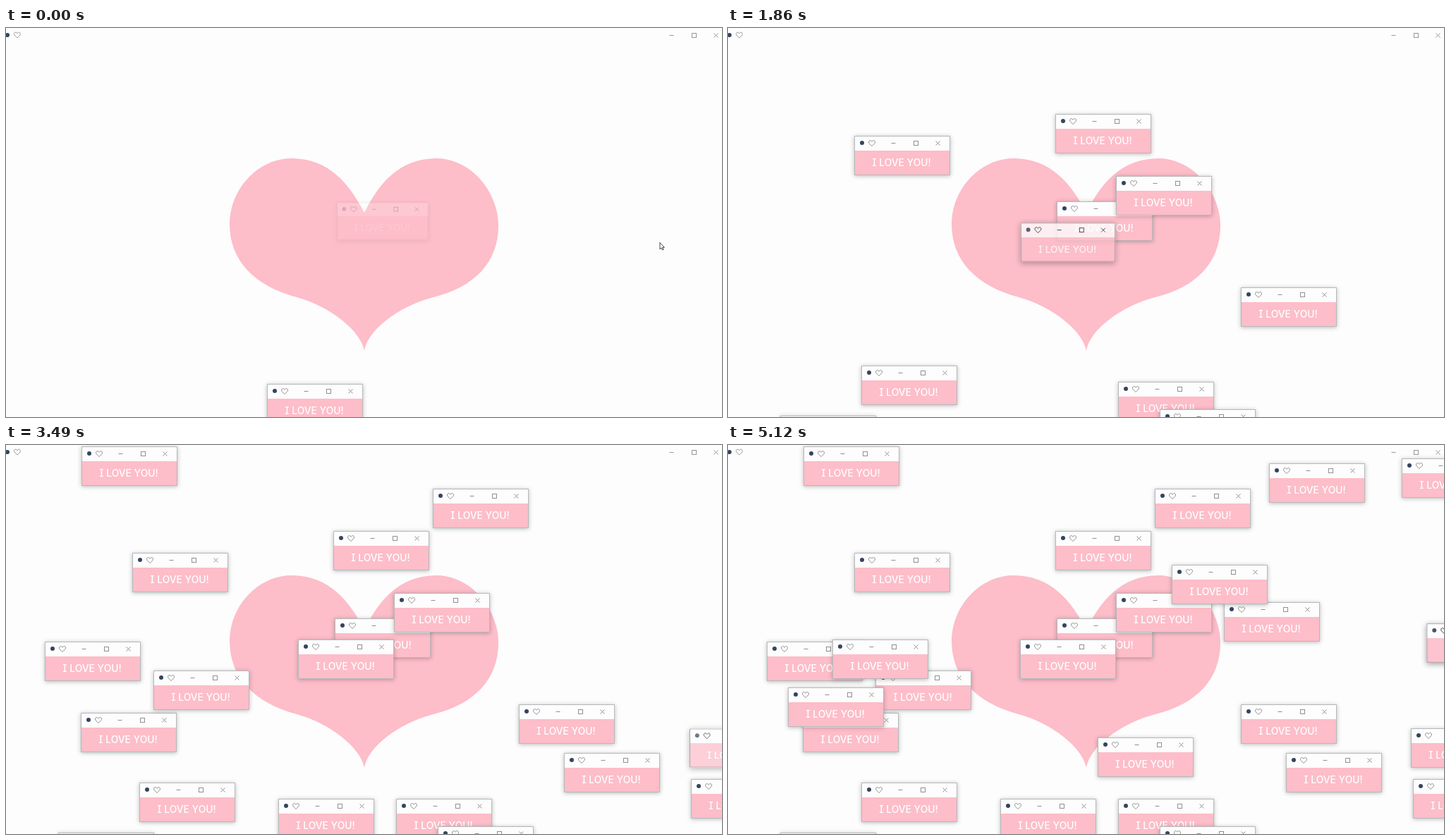
An HTML page for the animation above (5.48 s loop, 1015x552 px).

```html
<!DOCTYPE html>
<html lang="en">
<head>
<meta charset="utf-8">
<title>I LOVE YOU!</title>
<style>
  html, body { margin: 0; width: 100%; height: 100%; overflow: hidden; background: #fdfdfd; }
  #stage { position: relative; width: 1015px; height: 552px; overflow: hidden; background: #fdfdfd; }
  svg { position: absolute; left: 0; top: 0; display: block; }
  .icons { fill: none; stroke: currentColor; stroke-width: 1; }
  .main { color: #969696; }
  .win {
    position: absolute; width: 136px; height: 56px;
    color: #909090; background: #fdfdfd;
    box-shadow: 0 1px 6px rgba(40, 44, 40, .32);
  }
  .win.active { color: #222; box-shadow: 0 2px 8px rgba(30, 34, 30, .45); }
  .edge { fill: none; stroke: #b6b8bc; }
  .active .edge { stroke: #85878a; }
  .win text {
    font: 500 13.8px Inter, "Open Sans", sans-serif;
    font-feature-settings: "cv08";
    fill: #fff; text-anchor: middle;
  }
</style>
</head>
<body>
<div id="stage">
  <svg width="1015" height="552">
    <defs>
      <path id="heart" d="M0 4C-2 2-4.5 .5-4.5-1.6C-4.5-4.2-1.2-4.8 0-2.2C1.2-4.8 4.5-4.2 4.5-1.6C4.5 .5 2 2 0 4Z"/>
      <g id="buttons">
        <path d="M-34.5 .5h6M28.5-2.5l6 6m0-6l-6 6"/>
        <rect x="-2.5" y="-2.5" width="6" height="6"/>
      </g>
    </defs>
    <path fill="#fdbdc9" d="M508 262C490 228 462 185 405 185C356 185 317 230 317 278C317 330 352 366 412 382
      C460 395 503 430 508 458C512 430 555 395 606 382C664 368 698 332 698 281C698 232 659 185 610 185C553 185 525 228 508 262Z"/>
    <circle cx="2" cy="10" r="3" fill="#35445f"/>
    <g class="icons main">
      <use href="#heart" x="16" y="10"/>
      <use href="#buttons" x="975" y="10"/>
    </g>
  </svg>
</div>
<script>
const LOOP = 5480, LAST = 110, STEP = 5120 / LAST, FADE = 200, FOCUS = 185;

// Top left corners in opening order; the first window is on its way out.
const places = `370,505 466,246 189,479 553,502 74,550 727,368 550,210 464,122 179,153 612,541
  414,276 106,380 971,474 209,320 55,279 107,2 605,62 791,437 386,502 968,402
  703,223 85,344 767,26 955,19 524,415 629,170 148,276 990,253`
  .split(/\s+/).map(pair => pair.split(","));

// Opening rhythm: window index and time, evenly spaced in between.
const beats = [[0, -230], [6, 950], [14, 2460], [17, 2982], [22, 3899], [27, 4940]];

function openTime(i) {
  const k = Math.max(1, beats.findIndex(([n]) => n >= i));
  const [[n0, t0], [n1, t1]] = [beats[k - 1], beats[k]];
  return t0 + (t1 - t0) * (i - n0) / (n1 - n0);
}

const face = `<svg width="136" height="56">
  <rect y="21" width="136" height="35" fill="#fdbdc9"/>
  <circle cx="11" cy="10" r="3" fill="#35445f"/>
  <g class="icons"><use href="#heart" x="25" y="10.5"/><use href="#buttons" x="87" y="10"/></g>
  <text x="67" y="43">I LOVE YOU!</text>
  <rect class="edge" x=".5" y=".5" width="135" height="55"/></svg>`;

const stage = document.getElementById("stage");

const windows = places.map(([x, y], i) => {
  const el = document.createElement("div");
  el.className = "win";
  el.style.left = x + "px";
  el.style.top = y + "px";
  el.innerHTML = face;
  stage.append(el);
  return { el, open: openTime(i) };
});

stage.insertAdjacentHTML("beforeend", `<svg id="cursor" width="1015" height="552">
  <path d="M927 304.5v9.5l2.2-2 1.4 3 1.5-.7-1.4-2.9h2.6z" fill="#fff" stroke="#333" stroke-width=".9"/></svg>`);
const leaving = [windows[0].el, document.getElementById("cursor")];

function draw(t) {
  for (const { el, open } of windows) {
    const age = t - open;
    const p = Math.min(1, Math.max(0, age / FADE));
    el.style.opacity = p;
    el.style.transform = p < 1 ? `scale(${0.95 + 0.05 * p})` : "none";
    el.classList.toggle("active", age < FOCUS);
  }
  for (const el of leaving) el.style.display = t < STEP ? "" : "none";
}

const start = performance.now();
function tick() {
  const ms = Math.max(0, performance.now() - start) % LOOP;
  draw(Math.min(LAST, Math.floor((ms + 5) / STEP)) * STEP);
  requestAnimationFrame(tick);
}
tick();
</script>
</body>
</html>
```
